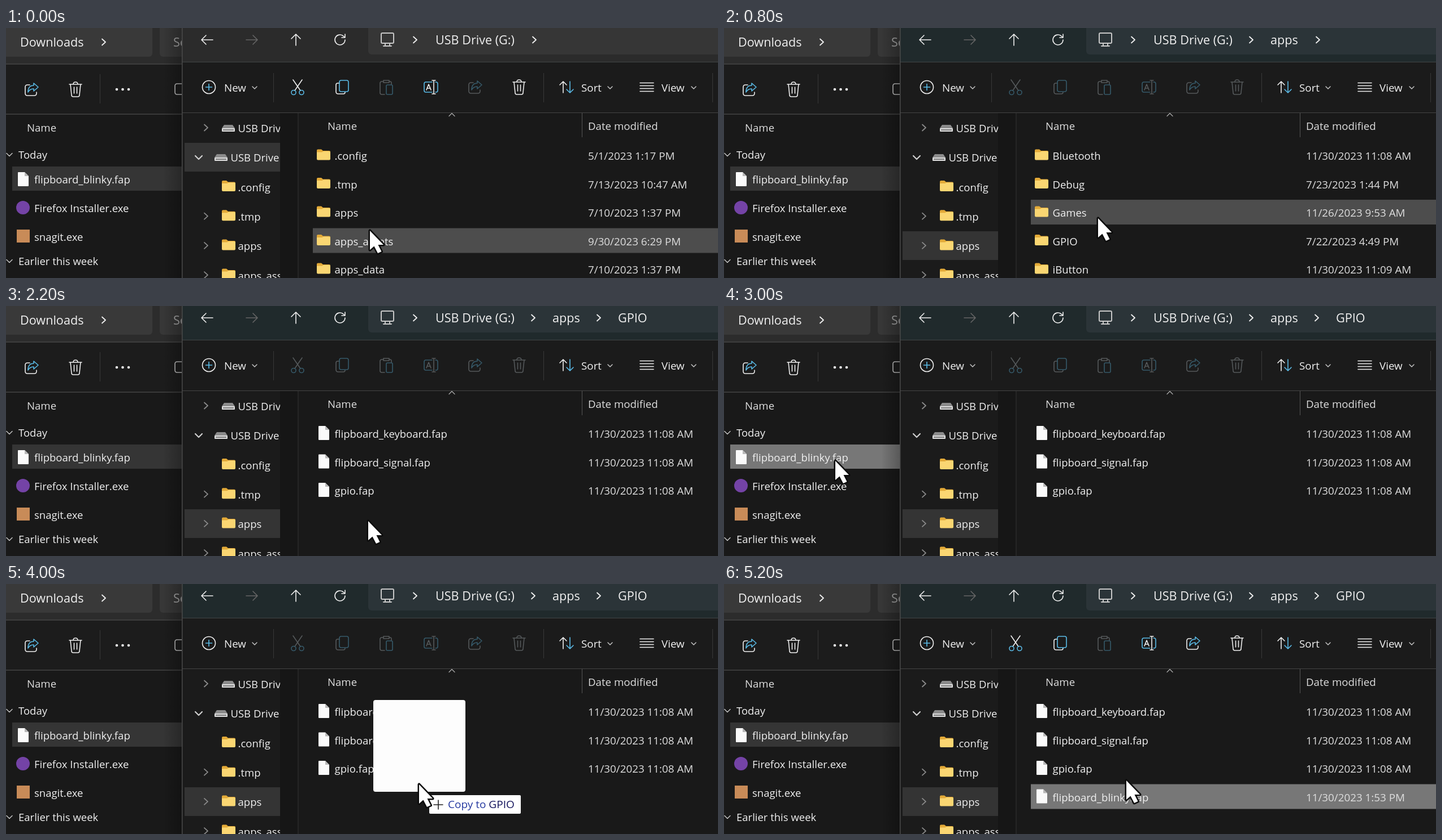
An HTML page with a canvas that plays this animation: 1260 px wide and 444 px high, repeating every 5.4 s.

```html
<!DOCTYPE html>
<html lang="en">
<head>
<meta charset="utf-8">
<title>Copying a file to a USB drive</title>
<style>
html, body { margin: 0; width: 1260px; height: 444px; overflow: hidden; background: #191919; }
canvas { display: block; }
</style>
</head>
<body>
<canvas id="stage" width="1260" height="444"></canvas>
<script>
const c = document.getElementById('stage').getContext('2d');
const LOOP = 5400, WHITE = '#f0f0f0', BLUE = '#5bbce8', DIM = '#55595b', DIM_BLUE = '#365a6a';

// Pointer tip by time: [ms, x, y]
const pointer = [
  [0, 642, 357], [200, 650, 332], [800, 660, 335], [1000, 661, 338], [1200, 657, 344],
  [1400, 651, 355], [1600, 648, 366], [2000, 645, 372], [2200, 639, 379], [2600, 625, 365],
  [2800, 395, 302], [3000, 195, 272], [3200, 197, 274], [3400, 199, 275], [3600, 300, 292],
  [3800, 560, 335], [4000, 729, 353], [4200, 722, 350], [4400, 716, 348], [4600, 713, 346],
  [5000, 712, 347], [5200, 710, 346]
];

const late = '11/30/2023 11:08 AM';
const folders = {
  root: [['.config', '5/1/2023 1:17 PM'], ['.tmp', '7/13/2023 10:47 AM'], ['apps', '7/10/2023 1:37 PM'],
    ['apps_assets', '9/30/2023 6:29 PM'], ['apps_data', '7/10/2023 1:37 PM']],
  apps: [['Bluetooth', late], ['Debug', '7/23/2023 1:44 PM'], ['Games', '11/26/2023 9:53 AM'],
    ['GPIO', '7/22/2023 4:49 PM'], ['iButton', '11/30/2023 11:09 AM']],
  gpio: [['flipboard_keyboard.fap', late], ['flipboard_signal.fap', late], ['gpio.fap', late],
    ['flipboard_blinky.fap', '11/30/2023 1:53 PM']]
};

function rect(x, y, w, h, color, r = 0) {
  c.fillStyle = color;
  c.beginPath();
  c.roundRect(x, y, w, h, r);
  c.fill();
}

function text(s, x, y, size = 18.5, color = WHITE) {
  c.font = `${size}px "Open Sans", "Noto Sans", sans-serif`;
  c.fillStyle = color;
  c.fillText(s, x, Math.round(y));
}

function at(x, y, paint) {
  c.save();
  c.translate(x, y);
  paint();
  c.restore();
}

function line(x, y, d, color = WHITE, width = 1.6) {
  at(x, y, () => {
    c.strokeStyle = color;
    c.lineWidth = width;
    c.lineCap = c.lineJoin = 'round';
    c.stroke(new Path2D(d));
  });
}

function shape(x, y, d, color) {
  at(x, y, () => {
    c.fillStyle = color;
    c.fill(new Path2D(d));
  });
}

function clip(x, y, w, h, paint) {
  c.save();
  c.beginPath();
  c.rect(x, y, w, h);
  c.clip();
  paint();
  c.restore();
}

function shade(x, w, alpha) {
  const g = c.createLinearGradient(x, 0, x + w, 0);
  g.addColorStop(0, 'rgba(0,0,0,0)');
  g.addColorStop(1, `rgba(0,0,0,${alpha})`);
  c.fillStyle = g;
  c.fillRect(x, 0, w, 444);
}

const right = (x, y, color = WHITE, w = 1.8) => line(x, y, 'M-3-5.5L3 0L-3 5.5', color, w);
const down = (x, y, s = 4, color = '#c4c4c4', w = 1.5) =>
  line(x, y, `M${-s} ${-s / 2}L0 ${s / 2}L${s} ${-s / 2}`, color, w);

function folder(x, y) {
  shape(x, y, 'M0 2Q0 0 2 0H8L11 2.5H22Q24 2.5 24 4.5V17H0Z', '#e3aa38');
  shape(x, y, 'M0 5H9L12 3.5H22Q24 3.5 24 5.5V17Q24 19 22 19H2Q0 19 0 17Z', '#fad672');
}

function file(x, y) {
  shape(x, y, 'M1 0H12L19 7V24Q19 25 18 25H1Q0 25 0 24V1Q0 0 1 0Z', '#fafafa');
  shape(x, y, 'M12 0L19 7H12Z', '#b8b8b8');
}

function drive(x, y) {
  shape(x, y, 'M4 0H19L23 6H0Z', '#8b8b8b');
  rect(x, y + 6, 23, 6, '#dedede', 1);
  rect(x + 2, y + 8, 19, 2, '#777');
}

function share(x, y, a, b) {
  line(x, y, 'M-3-8H-7Q-11-8-11-4V7Q-11 11-7 11H5Q9 11 9 7V5', a);
  line(x, y, 'M4-11L12-4L4 3V-1Q-3-1-6 5Q-6-7 4-7Z', b);
}

function trash(x, y, a) {
  line(x, y, 'M-11-9H11M-4-9Q-4-13 0-13T4-9M-9-9L-7 10Q-7 13-4 13H4Q7 13 7 10L9-9M-2.5-4V7M2.5-4V7', a);
}

function separator(x, y) {
  rect(x, y, 1, 52, '#383838');
}

function downloads(state) {
  rect(0, 0, 311, 64, '#2c2c2c');
  rect(-8, -8, 267, 59, '#393939', 6);
  rect(272, -8, 60, 59, '#373737', 6);
  text('Downloads', 25, 33, 21.6);
  right(173, 25);
  text('Search', 296, 33, 21.6, '#a4a4a4');
  rect(0, 63, 311, 2, '#3d3d3d');
  rect(0, 65, 311, 87, '#1c1c1c');
  share(45, 109, WHITE, BLUE);
  trash(123, 109, WHITE);
  separator(166, 82);
  for (const x of [196, 206.5, 217]) rect(x - 2.3, 106.7, 4.6, 4.6, WHITE, 2.3);
  line(299, 99, 'M16 0H4Q0 0 0 4V15Q0 19 4 19H16', '#c0c0c0');
  rect(0, 152, 311, 2, '#3a3a3a');

  text('Name', 37, 184, 18.6, '#dedede');
  down(6, 225, 5);
  text('Today', 22, 232);
  rect(11, 246, 300, 43, state.leftHover ? '#777' : '#353535');
  file(21, 256);
  text('flipboard_blinky.fap', 50, 276);
  rect(18, 307, 24, 24, '#7443a6', 12);
  text('Firefox Installer.exe', 50, 327);
  rect(19, 358, 23, 23, '#c88b58');
  text('snagit.exe', 50, 378);
  down(6, 414, 5);
  text('Earlier this week', 22, 421);
  shade(278, 33, .25);
}

function navigation(place) {
  const root = place === 'root';
  rect(312, 0, 948, 60, root ? '#2b2b2b' : '#202a2c');
  rect(641, -8, 640, 55, root ? '#363636' : '#2b3438', 6);
  line(356, 21, 'M10 0H-10M-2-8L-10 0L-2 8');
  line(435, 21, 'M-10 0H10M2-8L10 0L2 8', '#666');
  line(513, 21, 'M0 10V-10M-8-2L0-10L8-2');
  line(591, 21, 'M9 0A9 9 0 1 1 5-7.5L9-4M9-10V-4H3');
  line(675, 21, 'M-9-12H9Q11-12 11-10V4Q11 6 9 6H-9Q-11 6-11 4V-10Q-11-12-9-12ZM-4 6V11M4 6V11M-7 11H7', '#c8c8c8', 2);
  right(724, 21);
  text('USB Drive (G:)', 760, 29, 21.6);
  right(root ? 935 : 933, 21);
  if (root) return;
  text('apps', 967, 29, 21.6);
  right(place === 'gpio' ? 1049 : 1051, 21);
  if (place === 'gpio') text('GPIO', 1083, 29, 21.6);
}

function toolbar(on, shareOn) {
  const a = on ? WHITE : DIM, b = on ? BLUE : DIM_BLUE, y = 105;
  rect(312, 60, 948, 1, '#414545');
  rect(312, 61, 948, 89, '#1b1b1b');
  rect(312, 150, 948, 1, '#444');
  line(359, y, 'M-11.5 0A11.5 11.5 0 1 1 11.5 0A11.5 11.5 0 1 1-11.5 0');
  line(359, y, 'M-5.5 0H5.5M0-5.5V5.5', BLUE);
  text('New', 386, 113, 18.8);
  down(440, 106);
  [473, 951, 1250].forEach(x => separator(x, 80));

  line(516, y, 'M-8-13L5 6M8-13L-5 6', a);
  line(516, y, 'M-11 9.5A4 4 0 1 1-3 9.5A4 4 0 1 1-11 9.5M3 9.5A4 4 0 1 1 11 9.5A4 4 0 1 1 3 9.5', b);
  line(595, y, 'M-5-7H-8Q-11-7-11-4V8Q-11 12-7 12H2Q5 12 5 9', a);
  line(595, y, 'M-2-12H8Q11-12 11-9V5Q11 8 8 8H-2Q-5 8-5 5V-9Q-5-12-2-12Z', b);
  line(673, y, 'M-5-10H-8Q-11-10-11-7V10Q-11 13-8 13H-3M5-10H7Q9-10 9-7V-5M-5-12H5V-8H-5Z', DIM);
  line(673, y, 'M2-4H9Q11-4 11-2V11Q11 13 9 13H2Q0 13 0 11V-2Q0-4 2-4Z', DIM_BLUE);
  line(752, y, 'M2-9H-9Q-12-9-12-6V6Q-12 9-9 9H2M8-9H9Q12-9 12-6V6Q12 9 9 9H8', b);
  line(752, y, 'M-8 5L-4-5L0 5M-7 2H-1M5-12V12M2-12H8M2 12H8', a);
  share(830, y, shareOn ? WHITE : DIM, shareOn ? BLUE : DIM_BLUE);
  trash(908, y, a);

  line(986, y, 'M0 10V-10M-6-4L0-10L6-4');
  line(998, y, 'M0-10V10M-6 4L0 10L6 4', BLUE);
  text('Sort', 1018, 113, 18.8);
  down(1069, 106);
  line(1122, 97.5, 'M0 0H24M0 5H24M0 10H24M0 15H24');
  text('View', 1160, 113, 18.8);
  down(1217, 106);
}

function sidebar(place) {
  rect(312, 151, 173, 293, '#1b1b1b');
  rect(316, place === 'root' ? 204 : 361, 169, 51, '#343434');
  clip(312, 151, 173.5, 293, () => {
    drive(382, 172);
    text('USB Drive', 410.5, 185);
    down(341, 230, 6, '#d0d0d0', 2.2);
    drive(369, 224);
    text('USB Drive (G:)', 397.5, 237);
    ['.config', '.tmp', 'apps', 'apps_assets'].forEach((name, i) => {
      const y = 283 + i * 52.2;
      folder(382, y - 12);
      text(name, 410.5, y + 7);
      if (i) right(354, y - 1, '#8a8a8a');
    });
    right(354, 177, '#8a8a8a');
  });
  rect(485, 151, 31, 293, '#161616');
  rect(516, 151, 2, 293, '#252525');
}

function listing(state) {
  const isFile = state.place === 'gpio';
  line(789, 154, 'M-5 2.5L0-2.5L5 2.5', '#aaa', 1.3);
  text('Name', 569, 181, 18.6, '#dedede');
  rect(1019, 151, 1, 43, '#555');
  text('Date modified', 1030, 181, 18.7, '#dedede');
  folders[state.place].forEach(([name, date], i) => {
    if (isFile && i === 3 && !state.copied) return;
    const y = 228 + i * 50.5;
    if (i === state.row) rect(543, y - 24, 717, 44, state.selected ? '#777' : '#4d4d4d');
    isFile ? file(553, y - 15) : folder(550, y - 12.5);
    text(name, 581.5, y + 6);
    text(date, 1030, y + 6, 18.8, '#dedede');
  });
}

function dragged(x, y, label) {
  rect(x - 79, y - 147, 163, 163, '#fdfdfd', 4);
  if (!label) return;
  rect(x + 20, y + 22, 162, 33, '#fff', 2);
  line(x + 36, y + 39, 'M-8 0H8M0-8V8', '#222');
  text('Copy to ', x + 53, y + 45, 19, '#2438a0');
  text('GPIO', x + 53 + c.measureText('Copy to ').width, y + 45, 19, '#14145c');
}

function arrow(x, y) {
  const d = 'M2 3V37L9.5 30.5L16 43L22.5 40L16.5 28H26Z';
  line(x, y, d, '#0c0c0c', 5);
  shape(x, y, d, '#fff');
}

function stateAt(t) {
  const within = (a, b) => t >= a && t < b;
  const place = t < 600 ? 'root' : t < 2000 ? 'apps' : 'gpio';
  const copied = t >= 4600;
  let row = -1;
  if (t < 200 || within(1600, 2000) || copied) row = 3;
  else if (t < 1400) row = 2;
  return {
    place, copied, row,
    selected: within(1800, 2000) || copied,
    leftHover: within(3000, 3600),
    drag: within(3600, 4400),
    label: t >= 3800
  };
}

function draw(now) {
  const t = now % LOOP, state = stateAt(t);
  const [, x, y] = pointer.findLast(p => p[0] <= t);
  rect(0, 0, 1260, 444, '#191919');
  clip(0, 0, 311, 444, () => downloads(state));
  navigation(state.place);
  toolbar(state.place === 'root' || state.copied, state.copied);
  sidebar(state.place);
  listing(state);
  rect(311, 0, 1.5, 444, '#4a4a4a');
  if (state.drag) dragged(x, y, state.label);
  arrow(x, y);
}

const start = performance.now();
function tick() {
  draw(performance.now() - start);
  requestAnimationFrame(tick);
}
tick();
</script>
</body>
</html>
```
